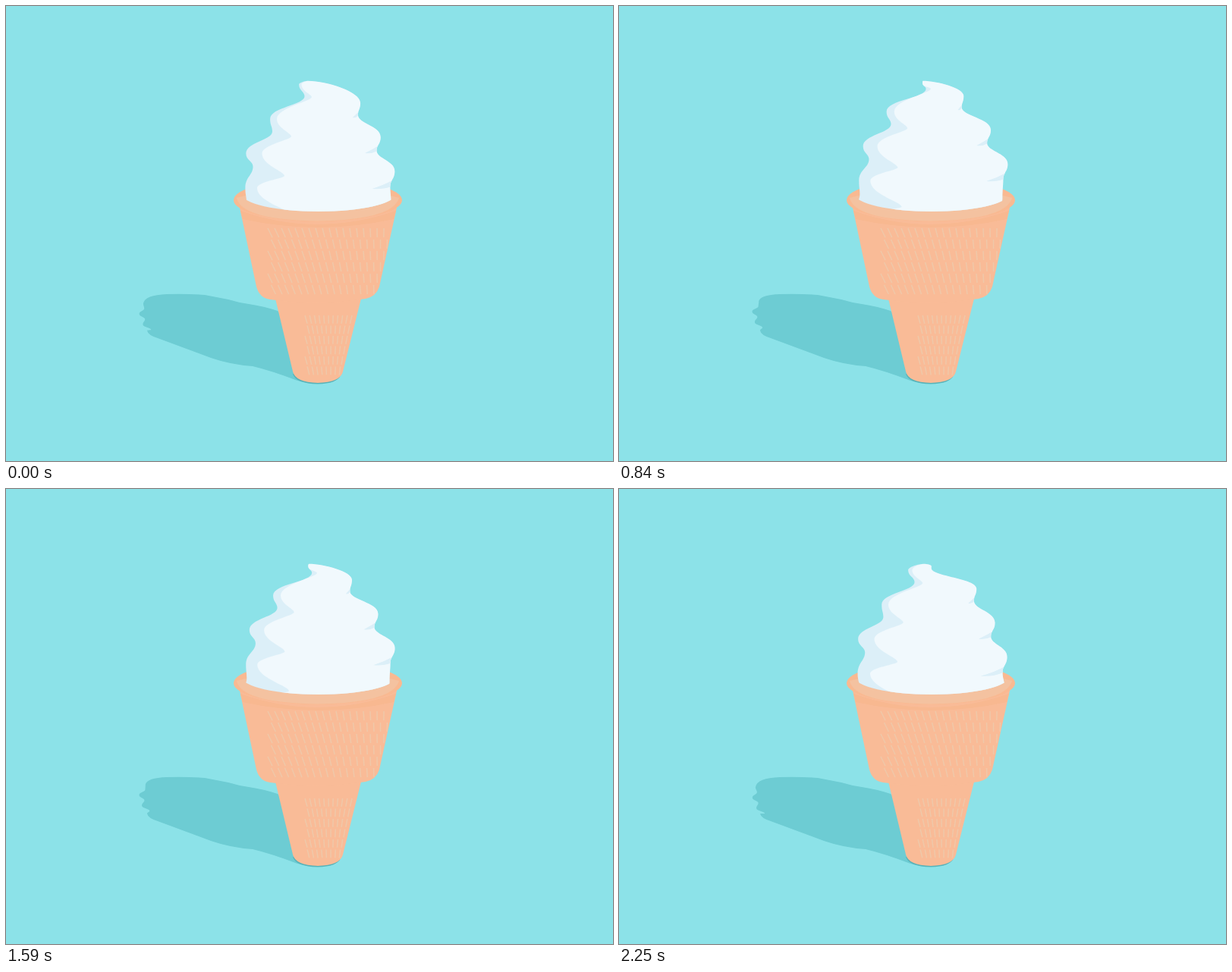
An HTML page that plays this animation: 800 by 600 pixels, repeating every 2.28 s.

```html
<!DOCTYPE html>
<html lang="en">
<head>
<meta charset="utf-8">
<title>Soft serve</title>
<style>
html, body { margin: 0; width: 100%; height: 100%; overflow: hidden; background: #8ce2e8; }
svg { display: block; width: 800px; height: 600px; }
</style>
</head>
<body>
<svg viewBox="0 0 800 600">
  <defs>
    <clipPath id="opening"><path d="M290 80H530V248H513A101 23 0 0 1 311 248H290Z"/></clipPath>
    <clipPath id="silhouette"><path id="mask"/></clipPath>
  </defs>
  <path id="shadow" fill="#6dccd3"/>
  <path d="M378 485Q382 498 411 498.500Q436 498 441 487Z" fill="#58b3b9"/>
  <path d="M355 386L378 482Q381 496 411 497Q441 496 444 482L468 386Z" fill="#f9bb97"/>
  <path d="M308 266L330 370Q334 385 348 387Q411 396 474 386Q488 383 492 370L515 266Z" fill="#f9bb97"/>
  <path d="M309 270Q411 306 514 270L511 281Q411 303 312 281Z" fill="#f8b890"/>
  <path id="texture" fill="none" stroke="#efc8a9" stroke-width="1.5"/>
  <ellipse cx="411" cy="256" rx="111" ry="28" fill="#f9b991"/>
  <path d="M304 253Q310 282 411 283.500Q510 282 518 253L506 250Q411 280 316 250Z" fill="#f4c2a0"/>
  <g clip-path="url(#opening)">
    <path id="shade" fill="#dceff8"/>
    <g clip-path="url(#silhouette)">
      <path id="light" fill="#f1f9fd"/>
      <path id="folds" fill="#dceff8"/>
    </g>
  </g>
</svg>
<script>
const LOOP = 2280, TURN = 380, STEP = 30;
const el = id => document.getElementById(id);
const wave = turns => Math.cos(2 * Math.PI * turns);

// Ridges and dips climb one level per turn, tapering towards the tip.
const taper = s => Math.max(0, s) ** 2;
const sway = s => 4 * wave((s - 1.8) / 1.65);
const outerRidge = s => [312 + 8.3 * taper(s) + sway(s), 240 - 45.5 * s];
const outerDip = s => [317 + 8.5 * taper(s), 258 - 46.3 * s];
const innerRidge = s => [331 + 6.5 * taper(s), 240 - 45.5 * s];
const innerDip = s => [367 + 9 * (s - 1) ** 2, 276 - 52 * s];
const rightRidge = s => [509 - 11.2 * taper(s) + sway(s), 218 - 45 * s];
const rightDip = s => [503 - 10.5 * taper(s) + sway(s), 237.5 - 47 * s];

// Alternating ridges and dips from the top down; h is the length of the vertical tangent.
function side(q, ridge, dip, topLevel, dipHandle = .4) {
  const points = [];
  for (let s = q + 3; s >= q - 2; s--) {
    if (s > topLevel) continue;
    const [rx, ry] = ridge(s), [dx, dy] = dip(s);
    const y = Math.max(101.5, ry);
    points.push({ x: rx, y, h: .52 }, { x: dx, y: Math.max(y + 3, dy), h: dipHandle });
  }
  return points;
}

function handle(p, q) {
  return p.tip ? [p.x + .35 * (q.x - p.x), p.y] : [p.x, p.y + p.h * (q.y - p.y)];
}

function curves(points) {
  return points.slice(1).map((p, i) =>
    `C${handle(points[i], p)} ${handle(p, points[i])} ${p.x} ${p.y}`).join('');
}

function fold(s) {
  const [rx, ry] = rightRidge(s), [dx, dy] = rightDip(s);
  const low = Math.max(0, -s);
  const reach = Math.max(5, 24 - 8.5 * s + 60 * low);
  const x = dx - reach, y = dy + 3.5 + 25 * low;
  return `M${rx + 4} ${ry + .4 * (dy - ry)}Q${dx - reach * .2} ${y - 6} ${x} ${y}` +
    `Q${dx - reach * .4} ${y + 1} ${dx} ${dy + 1}L${rx + 8} ${dy - 3}Z`;
}

function shadow(q) {
  const edge = y => 175.5 + (y < 403 ? .045 : .017) * (y - 403) ** 2;
  const lobes = [];
  for (let y = 378 - 14 * q; y < 424; y += 14) {
    if (y > 382) lobes.push({ x: edge(y), y, h: .5 }, { x: edge(y + 7) + 6, y: y + 7, h: .4 });
  }
  lobes.push({ x: 186, y: 428, h: .5 });
  const { x, y } = lobes[0];
  return 'M358 402Q340 396 320 393Q306 391 293 387L262 381Q235 379 212 380' +
    `Q${x + 2} ${Math.min(381, y - 1)} ${x} ${y}` + curves(lobes) +
    'Q187 434 200 438L270 464Q296 473 325 475Q350 481 384 494Q412 502 438 490Z';
}

// Staggered rows of flecks that stop at the sloping right wall.
function flecks({ x0, y0, dx, dy, rows, right, slope, lean, turn }) {
  let d = '';
  for (let row = 0; row < rows; row++) {
    const y = y0 + row * dy;
    for (let x = x0 + row % 2 * dx / 2; x < right - row * dy * slope; x += dx) {
      d += `M${x} ${y}l${lean - (x - x0) * turn} ${dy * .8}`;
    }
  }
  return d;
}

function draw(ms) {
  const q = ms / TURN % 1;
  const tip = { x: 408 - 11 * wave(q - .08), y: 98.8, tip: true };
  const right = side(q, rightRidge, rightDip, 2.95);
  const shape = left => {
    const points = [...left.reverse(), tip, ...right];
    return `M${points[0].x} ${points[0].y}${curves(points)}Z`;
  };
  const outline = shape(side(q, outerRidge, outerDip, 3.28));
  el('shade').setAttribute('d', outline);
  el('mask').setAttribute('d', outline);
  el('light').setAttribute('d', shape(side(q, innerRidge, innerDip, 3.28, .2)));
  el('folds').setAttribute('d', [-1, 0, 1, 2].map(n => q + n)
    .filter(s => s > -.6 && s < 2.4).map(fold).join(''));
  el('shadow').setAttribute('d', shadow(q));
}

el('texture').setAttribute('d',
  flecks({ x0: 345, y0: 293, dx: 9, dy: 15, rows: 6, right: 507, slope: .22, lean: 6, turn: .04 }) +
  flecks({ x0: 394, y0: 408, dx: 6.2, dy: 13.5, rows: 6, right: 459, slope: .24, lean: 3, turn: .09 }));

const start = performance.now();
function tick() {
  const ms = (performance.now() - start) % LOOP;
  draw(Math.floor(ms / STEP) * STEP);
  requestAnimationFrame(tick);
}
tick();
</script>
</body>
</html>
```
